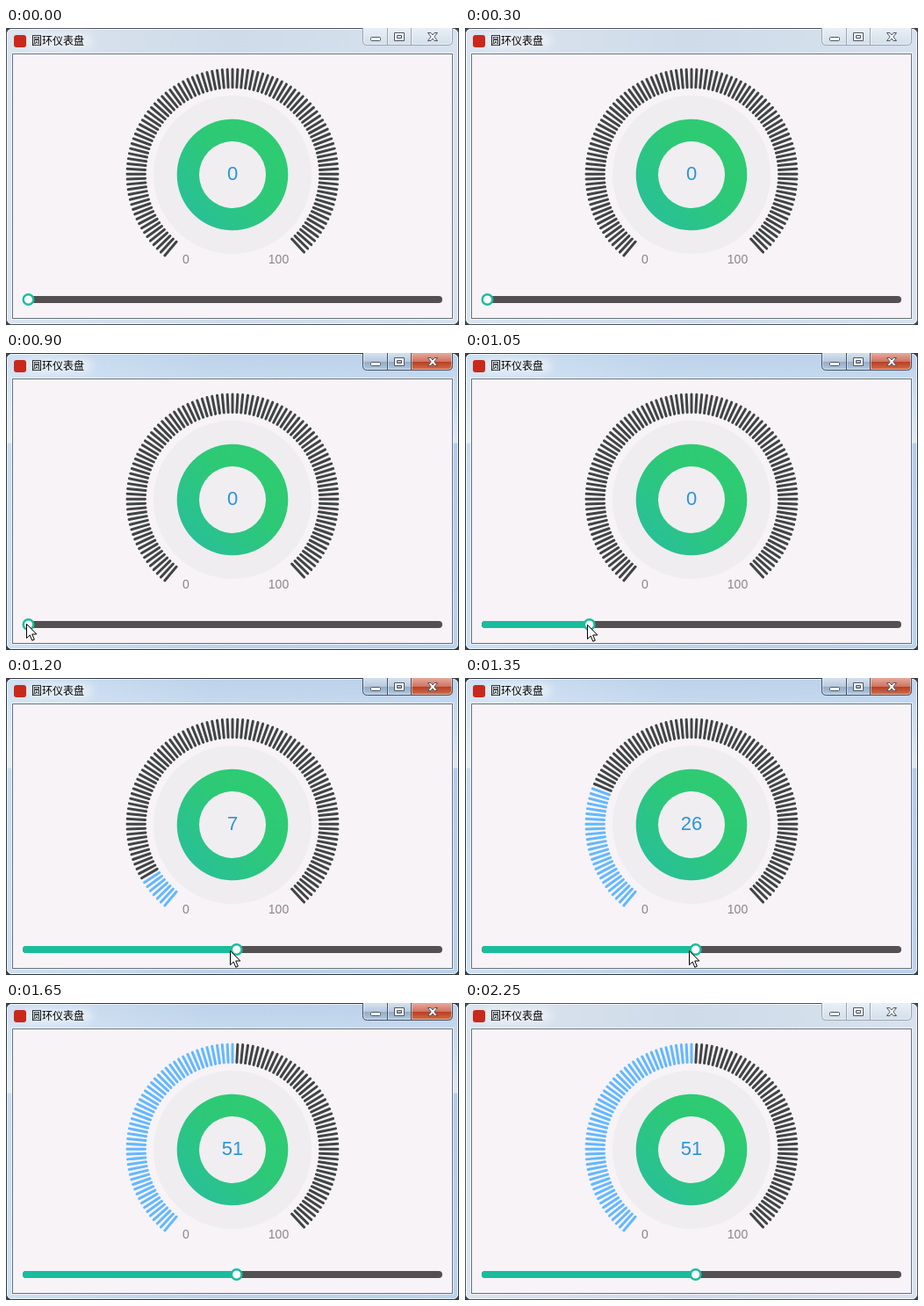
Write an HTML page that moves like this. It is 516x338 px and loops after 2400 ms.

```html
<!DOCTYPE html>
<html lang="zh">
<head>
<meta charset="utf-8">
<title>圆环仪表盘</title>
<style>
html, body { margin: 0; width: 100%; height: 100%; overflow: hidden; background: #3b3e42; }
svg { display: block; width: 516px; height: 338px; }
text { font-family: "Liberation Sans", Arial, sans-serif; }
.title { font: 12px "Noto Sans CJK SC", "Noto Sans CJK", sans-serif; fill: #000; }
.label { font-size: 14px; fill: #888; text-anchor: middle; }
#value { font-size: 22px; fill: #2c95da; text-anchor: middle; }
#ticks line { stroke: #404444; stroke-width: 3; stroke-linecap: round; }
#ticks line.on { stroke: #63b8ff; }
.glyph { fill: #fff; stroke: #4d5561; }
.focus { display: none; }
.active .focus { display: inline; }
.active .blur { display: none; }
</style>
</head>
<body>
<svg id="stage" viewBox="0 0 516 338">
  <defs>
    <linearGradient id="pale" x2="1">
      <stop stop-color="#dbe4ef"/><stop offset=".5" stop-color="#cfdbe9"/><stop offset="1" stop-color="#d8e2ee"/>
    </linearGradient>
    <linearGradient id="glass" x2="1">
      <stop stop-color="#c9dcf0"/><stop offset=".45" stop-color="#b4cde8"/><stop offset="1" stop-color="#b2cce9"/>
    </linearGradient>
    <linearGradient id="sheen" x2="0" y2="1">
      <stop stop-color="#fff" stop-opacity=".12"/><stop offset=".3" stop-color="#fff" stop-opacity=".55"/>
      <stop offset=".305" stop-color="#fff" stop-opacity="0"/><stop offset="1" stop-color="#fff" stop-opacity=".12"/>
    </linearGradient>
    <linearGradient id="paleBtn" x2="0" y2="1">
      <stop stop-color="#e9eff6"/><stop offset="1" stop-color="#d3deea"/>
    </linearGradient>
    <linearGradient id="blueBtn" x2="0" y2="1">
      <stop stop-color="#d5e1ee"/><stop offset=".48" stop-color="#b9cade"/>
      <stop offset=".5" stop-color="#94abc6"/><stop offset="1" stop-color="#b5cce4"/>
    </linearGradient>
    <linearGradient id="redBtn" x2="0" y2="1">
      <stop stop-color="#e5aa9c"/><stop offset=".48" stop-color="#cf7460"/>
      <stop offset=".5" stop-color="#b93c22"/><stop offset="1" stop-color="#d27650"/>
    </linearGradient>
    <linearGradient id="ringFill" x1=".85" y1=".15" x2=".15" y2=".85">
      <stop stop-color="#2ecc71"/><stop offset=".4" stop-color="#2dc976"/><stop offset="1" stop-color="#29c096"/>
    </linearGradient>
    <path id="btnShape" d="M406.5 0V14.5Q406.5 19.5 411.5 19.5H503.5Q508.5 19.5 508.5 14.5V0"/>
    <clipPath id="btnClip"><use href="#btnShape"/></clipPath>
    <filter id="soft" x="-30%" y="-100%" width="160%" height="300%"><feGaussianBlur stdDeviation="5"/></filter>
  </defs>

  <!-- window frame -->
  <rect class="blur" x=".5" y=".5" width="515" height="337" rx="6" fill="url(#pale)" stroke="#4c535b"/>
  <g class="focus">
    <rect x=".5" y=".5" width="515" height="337" rx="6" fill="url(#glass)" stroke="#2d3640"/>
    <rect x="1" y="1" width="514" height="336" rx="6" fill="url(#sheen)"/>
  </g>
  <rect x="1.5" y="1.5" width="513" height="335" rx="5" fill="none" stroke="#fff" stroke-opacity=".65"/>
  <rect x="22" y="7" width="76" height="15" rx="7" fill="#fff" opacity=".5" filter="url(#soft)"/>
  <rect x="9" y="8" width="14" height="14" rx="3" fill="#c9291a"/>
  <text class="title" x="29" y="19">圆环仪表盘</text>

  <!-- caption buttons -->
  <g clip-path="url(#btnClip)">
    <rect class="blur" x="406" width="103" height="20" fill="url(#paleBtn)"/>
    <g class="focus">
      <rect x="406" width="56" height="20" fill="url(#blueBtn)"/>
      <rect x="461" width="48" height="20" fill="url(#redBtn)"/>
    </g>
  </g>
  <g fill="none">
    <path d="M407.5 1V14.5Q407.5 18.5 411.5 18.5H503.5Q507.5 18.5 507.5 14.5V1M435.5 1V18M462.5 1V18" stroke="#fff" stroke-opacity=".45"/>
    <g class="blur" stroke="#98a4b3"><use href="#btnShape"/><path d="M434.5 0V19M461.5 0V19"/></g>
    <g class="focus" stroke="#465364"><use href="#btnShape"/><path d="M434.5 0V19M461.5 0V19"/></g>
  </g>
  <rect class="glyph" x="415.5" y="10.500" width="11" height="4" rx="1"/>
  <path class="glyph" fill-rule="evenodd" d="M442.500 5.500H453.500V14.500H442.500ZM445.500 8.500V11.500H450.500V8.500Z"/>
  <path class="glyph" d="M480.500 5.500H484L486 8L488 5.500H491.500L487.800 10L491.500 14.500H488L486 12L484 14.500H480.500L484.200 10Z"/>

  <!-- client area -->
  <rect x="6.5" y="28.5" width="503" height="303" fill="none" stroke="#fff" stroke-opacity=".6"/>
  <rect x="7.5" y="29.5" width="501" height="301" fill="#f7f3f7" stroke="#67727f"/>

  <!-- gauge -->
  <g id="ticks"></g>
  <circle cx="258" cy="167" r="90" fill="#efedf0"/>
  <circle cx="258" cy="167" r="63.300" fill="url(#ringFill)"/>
  <circle cx="258" cy="167" r="38" fill="#f0eef1"/>
  <text id="value" x="258" y="173">0</text>
  <text class="label" x="205" y="268">0</text>
  <text class="label" x="310.500" y="268">100</text>

  <!-- slider -->
  <rect x="19" y="305" width="478" height="8" rx="4" fill="#545052"/>
  <rect id="fill" x="19" y="305" height="8" rx="4" fill="#1abc9c"/>
  <circle id="knob" cy="309" r="5.800" fill="#fbfafb" stroke="#1abc9c" stroke-width="2.400"/>

  <path id="cursor" d="M.5 .5V16.500L4.200 13L6.800 19.200L9.300 18.100L6.700 12H11.800Z" fill="#fff" stroke="#000"/>
</svg>
<script>
const $ = id => document.getElementById(id);
const LOOP = 2400, TICKS = 100;
const REST = [255, 310];

// Each step holds until the next: start ms, gauge value, slider value, focused, cursor tip
const steps = [
  [0, 0, 0, false, null],
  [450, 0, 0, false, [24, 324]],
  [600, 0, 0, false, [20, 306]],
  [900, 0, 0, true, [23, 308]],
  [1050, 0, 25, true, [139, 309]],
  [1200, 7, 51, true, REST],
  [1350, 26, 51, true, REST],
  [1500, 45, 51, true, REST],
  [1650, 51, 51, true, null],
  [2250, 51, 51, false, null]
];

const ticks = Array.from({ length: TICKS }, (_, i) => {
  const line = document.createElementNS("http://www.w3.org/2000/svg", "line");
  const a = (40 + 2.8 * i) * Math.PI / 180;
  const put = (n, r) => {
    line.setAttribute("x" + n, 258 - r * Math.sin(a));
    line.setAttribute("y" + n, 167 + r * Math.cos(a));
  };
  put(1, 99.5);
  put(2, 120);
  return $("ticks").appendChild(line);
});

function show([, value, slide, focused, tip]) {
  ticks.forEach((line, i) => line.classList.toggle("on", i < value));
  $("value").textContent = value;
  const x = 25.5 + slide * 4.65;
  $("knob").setAttribute("cx", x);
  $("fill").setAttribute("width", x - 19);
  $("stage").classList.toggle("active", focused);
  $("cursor").style.display = tip ? "" : "none";
  if (tip) $("cursor").setAttribute("transform", `translate(${tip})`);
}

let current, start;
function tick(now) {
  start ??= now;
  const t = (now - start) % LOOP;
  const step = steps.findLast(s => s[0] <= t);
  if (step !== current) show(current = step);
  requestAnimationFrame(tick);
}
show(steps[0]);
requestAnimationFrame(tick);
</script>
</body>
</html>
```
